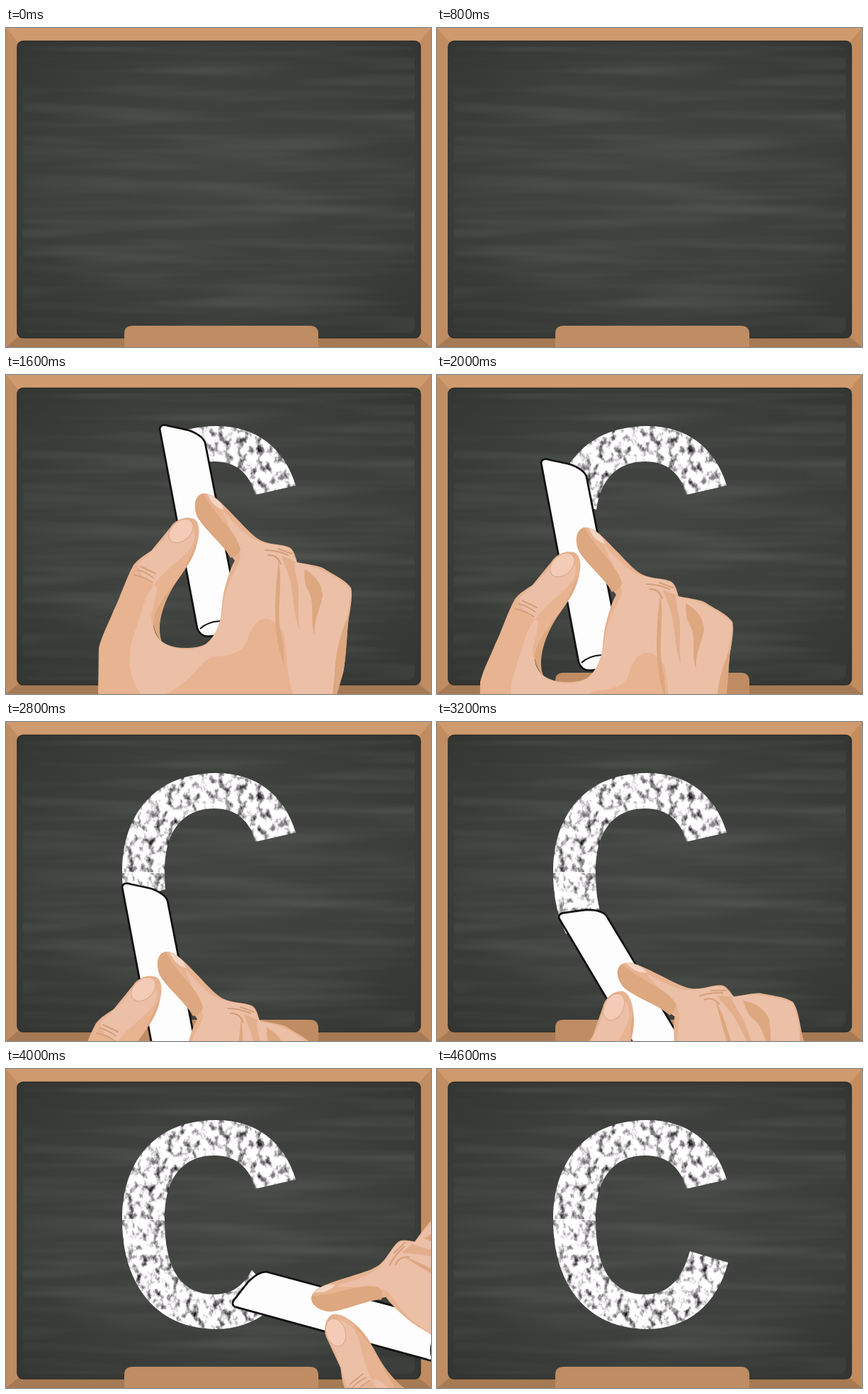
Recreate the animation shown at these times as an HTML page. Size 600x450 px, loop 4800 ms.

```html
<!DOCTYPE html>
<html lang="en">
<head>
<meta charset="utf-8">
<title>Chalk letter</title>
<style>
html, body { margin: 0; width: 100%; height: 100%; overflow: hidden; background: #c08c62; }
svg { display: block; width: 600px; height: 450px; }
</style>
</head>
<body>
<svg viewBox="0 0 600 450">
  <defs>
    <radialGradient id="slate" cx=".5" cy=".48" r=".68">
      <stop offset="0" stop-color="#434542"/>
      <stop offset=".6" stop-color="#3c3f3b"/>
      <stop offset="1" stop-color="#333633"/>
    </radialGradient>
    <filter id="streaks" x="0" y="0" width="1" height="1" color-interpolation-filters="sRGB">
      <feTurbulence type="fractalNoise" baseFrequency=".004 .06" numOctaves="2" seed="4"/>
      <feColorMatrix values="0 0 0 0 .5  0 0 0 0 .52  0 0 0 0 .5  .5 0 0 0 -.2"/>
      <feComposite in2="SourceGraphic" operator="in"/>
    </filter>
    <filter id="grain" x="0" y="0" width="1" height="1" color-interpolation-filters="sRGB">
      <feTurbulence type="fractalNoise" baseFrequency=".11 .08" numOctaves="3" seed="7"/>
      <feColorMatrix values="-2.4 0 0 0 2.15  -2.4 0 0 0 2.14  -2.4 0 0 0 2.15  0 0 0 0 1"/>
      <feComposite in2="SourceGraphic" operator="in"/>
    </filter>
    <clipPath id="drawn"><polygon id="wedge"/></clipPath>
  </defs>

  <!-- Board -->
  <rect width="600" height="450" fill="#c08c62"/>
  <path d="M0 0H600L583 20H17Z" fill="#cf9a6d"/>
  <path d="M0 450L17 436H583L600 450Z" fill="#a67a54"/>
  <rect x="16" y="18.500" width="569" height="418.500" rx="8" fill="url(#slate)" stroke="#2c2c27" stroke-width="1.500"/>
  <rect x="24" y="26" width="553" height="404" rx="8" filter="url(#streaks)"/>
  <path d="M167 450V431Q167 420 179 420H429Q441 420 441 432V450Z" fill="#bf8c63"/>

  <!-- Letter -->
  <g clip-path="url(#drawn)">
    <path filter="url(#grain)" d="M409 156C393 102 352 72 297 72C214 72 164 126 164 213C164 305 213 367 297 367C354 366 395 333 411 273L357 257C346 297 326 318 294 318C247 318 224 283 224 213C223 156 248 122 294 122C325 122 344 139 352 169Z"/>
    <path d="M164 212.500H224" stroke="#fff"/>
  </g>

  <!-- Hand with chalk -->
  <g id="hand">
    <path d="M217 76Q218 68 230 72Q245 75 258 78Q277 85 281 95L319 290L326 350Q300 372 280 368Q270 364 269 352Z" fill="#fdfdfd" stroke="#111" stroke-width="2.800" stroke-linejoin="round"/>
    <path d="M274 358Q284 348 303 347" fill="none" stroke="#111" stroke-width="1.800"/>
    <path fill="#e7b391" d="M118 640L121 530L130 450L131 385C136 365 146 348 152 332C162 312 168 290 180 268C188 258 198 253 205 248L232 215C240 202 258 198 267 204C274 210 273 225 271 232C268 250 262 262 248 281C228 310 209 335 208 352C210 374 226 384 250 385C275 386 292 378 297 365C306 345 303 320 309 300C313 285 318 270 323 262C308 240 282 220 270 200C264 185 268 170 278 167C292 166 300 176 330 207C342 220 350 228 359 233C373 240 388 238 400 243C407 247 408 255 411 264C430 268 445 269 452 275C465 283 480 290 487 300C490 312 486 330 483 350C481 370 480 400 476 420L467 450L450 640Z"/>
    <g fill="#ecbfa7">
      <path d="M305 190C325 212 340 230 359 235C376 241 394 239 402 247L411 265C435 268 462 280 486 301C488 320 478 350 474 385L462 450H405C395 420 398 390 391 362C370 330 350 345 342 370C338 390 320 395 300 397C275 395 270 430 225 450H190C176 430 172 408 176 382C182 360 190 340 196 318C212 280 245 265 262 242C272 220 262 203 247 205L232 217C225 235 200 252 186 268C190 290 206 292 213 300C211 330 200 338 208 356C212 378 235 388 260 387C290 385 300 360 306 330C312 285 330 270 331 258C328 235 316 220 305 190Z"/>
    </g>
    <g fill="#dda77f">
      <path d="M278 167C266 170 264 185 270 200C282 220 308 240 317 258Q329 255 331 246C325 220 300 205 278 167Z"/>
      <path d="M271 232C265 254 255 272 240 291C220 317 207 337 208 352Q211 368 220 376C210 350 226 310 248 281Z"/>
      <path d="M385 262C392 300 379 335 391 378L393 410C377 370 378 320 385 262Z"/>
      <path d="M421 274C436 282 446 294 447 311C444 330 434 345 436 366C428 350 437 320 427 305C420 294 422 283 421 274Z"/>
      <path d="M484 338C474 360 466 385 464 420L461 450H467L476 420C480 400 481 370 484 338Z"/>
      <path d="M411 264C405 258 407 274 412 294C415 315 410 340 415 360C405 340 407 310 400 285L389 255Z" opacity=".65"/>
    </g>
    <path d="M284 167C298 174 305 181 307 190C295 187 289 179 284 167Z" fill="#f4d5c4"/>
    <ellipse cx="247" cy="220" rx="20" ry="13.500" transform="rotate(-43 247 220)" fill="#f3cbb6" stroke="#dba684"/>
    <g fill="none" stroke="#d49f7a" stroke-width="2" stroke-linecap="round">
      <path d="M186 275Q198 278 208 286M181 282Q194 284 207 293M190 270L211 280"/>
      <path d="M366 247Q382 247 398 254M370 254Q383 253 388 267M384 245L403 252"/>
    </g>
  </g>
</svg>
<script>
const LOOP = 4800, STEP = 200, START = 1000;
// One pose per step: tip x, tip y, tilt, angle reached by the stroke
const poses = [
  [342, 89, 29, -60], [314, 65, 22, -78], [262, 59, 8, -98], [217, 75, 0, -115],
  [180, 98, 0, -138], [147, 123, 0, -160], [143, 159, 0, -178], [152, 194, 0, -187],
  [157, 197, 0, -190], [164, 232, 0, -197], [166, 262, -3, -211], [172, 276, -20, -217],
  [196, 308, -35, -235], [224, 335, -47, -256], [272, 352, -54, -280], [322, 335, -64, -308],
  [353, 287, -74, -340]
];
const hand = document.getElementById('hand');
const wedge = document.getElementById('wedge');
let shown = -1;

// Sector around the letter's centre, swept anticlockwise
function sector(end) {
  const points = ['294,215'];
  for (let i = 0; i <= 40; i++) {
    const a = (-15 + (end + 15) * i / 40) * Math.PI / 180;
    points.push(`${294 + 400 * Math.cos(a)},${215 + 400 * Math.sin(a)}`);
  }
  return points.join(' ');
}

function draw(time) {
  const step = Math.floor((time % LOOP) / STEP);
  if (step !== shown) {
    shown = step;
    const i = step - START / STEP;
    const [x, y, tilt, end] = poses[Math.max(0, Math.min(i, poses.length - 1))];
    hand.style.display = i >= 0 && i < poses.length ? '' : 'none';
    hand.setAttribute('transform', `translate(${x} ${y}) rotate(${tilt}) translate(-217 -75)`);
    wedge.setAttribute('points', i < 0 ? '' : sector(end));
  }
  requestAnimationFrame(draw);
}
draw(performance.now());
</script>
</body>
</html>
```
